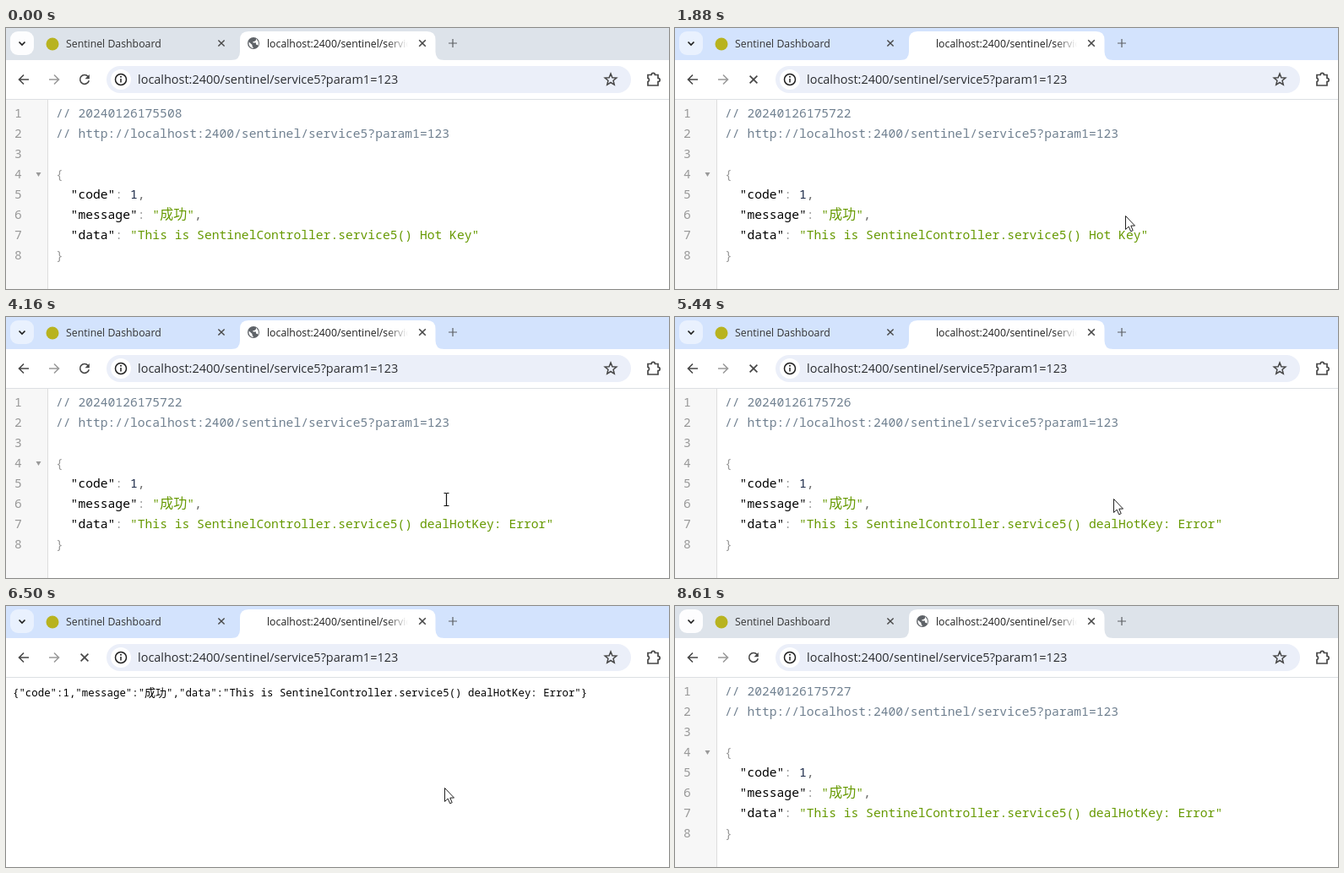
Write an HTML page with a canvas that moves like this. It is 785x309 px and loops after 8680 ms.

```html
<!DOCTYPE html>
<html lang="en">
<head>
<meta charset="utf-8">
<title>Hot key reload</title>
<style>
  html, body { margin: 0; width: 785px; height: 309px; overflow: hidden; background: #fff; }
  canvas { display: block; }
</style>
</head>
<body>
<canvas id="stage" width="785" height="309"></canvas>
<script>
const ctx = document.getElementById('stage').getContext('2d');
const LOOP = 8680, STEP = 70, CHAR = 8.8;
const mono = size => `${size}px "Noto Sans Mono", "DejaVu Sans Mono", monospace`;
const cjk = size => `${size}px "Noto Sans CJK SC", "Noto Sans CJK", sans-serif`;
const ui = size => `${size}px "Open Sans", "Noto Sans", sans-serif`;
const MONO = mono(14.67);
const INK = '#1f1f1f', ICON = '#474747', GREY = '#999', GREEN = '#669900', SLATE = '#708090';
const COMMA = '#666';
const URL_TEXT = 'localhost:2400/sentinel/service5?param1=123';

// Each reload: start, optional unformatted page, new content, end of loading, fold arrow shown
const loads = [
  { start: -999, show: -999, done: -999, fold: -999, stamp: '5508', error: false },
  { start: 880, blank: 1020, show: 1090, done: 1230, fold: 1610, stamp: '5722', error: false },
  { start: 1880, show: 1960, done: 2070, fold: 2330, stamp: '5722', error: true },
  { start: 4640, show: 4710, done: 4760, fold: 5110, stamp: '5725', error: false },
  { start: 5370, show: 5440, done: 5510, fold: 5650, stamp: '5726', error: true },
  { start: 5720, blank: 5790, raw: true, show: 5860, done: 5900, fold: 6170, stamp: '5726', error: false },
  { start: 6300, blank: 6440, raw: true, show: 6510, done: 6700, fold: 7100, stamp: '5727', error: true }
];

// Pointer path: time, x, y
const path = [
  [70, 712, 298], [220, 519, 214], [910, 519, 214], [1190, 533, 222], [2330, 533, 222],
  [2660, 510, 258], [2870, 489, 250], [2940, 490, 249], [3010, 508, 249], [3080, 527, 249],
  [3150, 584, 249], [3290, 635, 248], [3500, 635, 248], [3780, 519, 215], [6960, 519, 215],
  [7000, 520, 216], [7140, 520, 216], [7800, 746, 302]
];

function pointer(time) {
  const t = Math.floor(time / STEP) * STEP;
  let i = 1;
  while (i < path.length - 1 && path[i][0] < t) i++;
  const [t0, x0, y0] = path[i - 1], [t1, x1, y1] = path[i];
  const k = Math.min(1, Math.max(0, (t - t0) / (t1 - t0)));
  return { x: Math.round(x0 + (x1 - x0) * k), y: Math.round(y0 + (y1 - y0) * k) };
}

function text(str, x, y, color, font = MONO) {
  ctx.font = font;
  ctx.fillStyle = color;
  ctx.fillText(str, x, y);
}

function disc(x, y, r, color) {
  ctx.fillStyle = color;
  ctx.beginPath();
  ctx.arc(x, y, r, 0, 7);
  ctx.fill();
}

function box(x, y, w, h, r, color) {
  ctx.fillStyle = color;
  ctx.beginPath();
  ctx.roundRect(x, y, w, h, r);
  ctx.fill();
}

function stroke(d, color = ICON, width = 1.6) {
  ctx.strokeStyle = color;
  ctx.lineWidth = width;
  ctx.stroke(new Path2D(d));
}

function fill(d, color) {
  ctx.fillStyle = color;
  ctx.fill(new Path2D(d));
}

const cross = (x, y, r, width) =>
  stroke(`M${x - r} ${y - r}L${x + r} ${y + r}M${x + r} ${y - r}L${x - r} ${y + r}`, ICON, width);

function globe() {
  disc(293, 18, 7, '#5f6368');
  fill('M287.6 16.5L291.5 20v1.5l1.2 1.5v1A6 6 0 0 1 287.6 16.5Z', '#fff');
  fill('M291.5 12.5h4.5v2l-2 1.5h-1.5v1.5h3.5v2.2h1.6l1 1.2A6 6 0 0 0 298.3 15.5L296 12.5Z', '#fff');
}

function star() {
  ctx.beginPath();
  for (let i = 0; i < 10; i++) {
    const a = i * Math.PI / 5 - Math.PI / 2, r = i % 2 ? 3.2 : 7.2;
    ctx.lineTo(716 + r * Math.cos(a), 61.3 + r * Math.sin(a));
  }
  ctx.closePath();
  ctx.strokeStyle = ICON;
  ctx.lineWidth = 1.5;
  ctx.stroke();
}

function tabs(active, loading) {
  ctx.fillStyle = active ? '#d3e3fd' : '#dde3ea';
  ctx.fillRect(0, 0, 785, 38);
  box(5, 4, 28, 28, 9, active ? '#e9f1fe' : '#fdfdfe');
  stroke('M15.5 16.5L19 20L22.5 16.5', INK, 1.7);

  disc(55, 19, 7.5, '#b8b31f');
  text('Sentinel Dashboard', 71, 23, '#333', ui(12.3));
  cross(255, 18, 3.6, 1.4);

  fill('M267 38Q277 38 277 28V14Q277 4 287 4H498.5Q508.5 4 508.5 14V28Q508.5 38 518.5 38Z', '#fff');
  if (!loading) globe();
  const fade = ctx.createLinearGradient(450, 0, 476, 0);
  fade.addColorStop(0, INK);
  fade.addColorStop(1, 'rgba(31,31,31,0)');
  text(URL_TEXT, 309, 23, fade, ui(12.3));
  cross(493, 18, 3.8, 1.6);
  stroke('M524 18H534M529 13V23', '#5c5f63', 1.2);
}

function toolbar(loading) {
  ctx.fillStyle = '#fff';
  ctx.fillRect(0, 38, 785, 46);
  ctx.fillStyle = '#dcdfe3';
  ctx.fillRect(0, 84, 785, 1);

  stroke('M27 61H16M21 55.5L15.5 61L21 66.5');
  stroke('M51 61H62M57 55.5L62.5 61L57 66.5', '#9b9b9b');
  if (loading) {
    cross(93, 61, 4.4, 1.7);
  } else {
    stroke('M97.2 57.4A5.4 5.4 0 1 0 98.3 62.3');
    fill('M98.8 55V60.3H93.5Z', ICON);
  }

  box(119, 45, 621, 32, 16, '#ebeff9');
  disc(136, 61, 12, '#fff');
  stroke('M142.5 61A6.5 6.5 0 1 1 129.5 61A6.5 6.5 0 1 1 142.5 61M136 60V64.6', INK, 1.5);
  disc(136, 57.8, 1, INK);
  text(URL_TEXT, 156, 66, '#2b2d31', ui(14.48));
  star();
  stroke('M760 55.5H764.2A2.1 2.1 0 0 1 768.4 55.5H772V59.3A2.2 2.2 0 0 1 772 63.7V68H760V63.6' +
    'A2.2 2.2 0 0 0 760 59.4Z', ICON, 1.7);
}

// Writes [string, colour] pieces one after another
function line(x, y, parts, latin = MONO, han = cjk(16)) {
  for (const [str, color] of parts) {
    const wide = /[^\x00-\xff]/.test(str);
    text(str, x, y, color, wide ? han : latin);
    x += ctx.measureText(str).width;
  }
}

const row = (n, x, ...parts) => line(x, 82 + n * 24, parts);
const data = load =>
  `"This is SentinelController.service5() ${load.error ? 'dealHotKey: Error' : 'Hot Key'}"`;

function rawPage(load) {
  const parts = ['{"code":1,"message":"', '成功', `","data":${data(load)}}`];
  line(8, 107, parts.map(str => [str, '#000']), mono(12.4), cjk(13));
}

function page(load, folded, selected) {
  ctx.fillStyle = '#f7f7f7';
  ctx.fillRect(0, 85, 49, 224);
  ctx.fillStyle = '#ddd';
  ctx.fillRect(49, 85, 1, 224);
  for (let n = 1; n <= 8; n++) row(n, 10, [String(n), GREY]);
  if (folded) fill('M35.5 171H41.5L38.5 176Z', GREY);

  if (selected) {
    ctx.fillStyle = '#d5d0f0';
    ctx.fillRect(490, 233, selected * CHAR, 24);
  }
  const left = 59, inner = left + 2 * CHAR;
  row(1, left, ['// 2024012617' + load.stamp, SLATE]);
  row(2, left, ['// http://' + URL_TEXT, SLATE]);
  row(4, left, ['{', GREY]);
  row(5, inner, ['"code"', '#000'], [': ', GREY], ['1', '#1c2a48'], [',', COMMA]);
  row(6, inner, ['"message"', '#000'], [': ', GREY], ['"', GREEN], ['成功', GREEN], ['"', GREEN], [',', COMMA]);
  row(7, inner, ['"data"', '#000'], [': ', GREY], [data(load), GREEN]);
  row(8, left, ['}', GREY]);
}

function cursor(t, p) {
  const beam = (t >= 2400 && t < 4640) || (t >= 7030 && p.y < 281);
  ctx.save();
  ctx.translate(p.x + 0.5, p.y + 0.5);
  if (beam) {
    stroke('M-1 -7H1Q2 -7 2 -6Q2 -7 3 -7H5M2 -6V7M-1 8H1Q2 8 2 7Q2 8 3 8H5', '#111', 1.2);
  } else {
    const d = 'M0 0V16L3.7 12.6L6.2 18.3L8.7 17.2L6.3 11.6H11Z';
    fill(d, '#fff');
    stroke(d, '#222', 1);
  }
  ctx.restore();
}

function draw(t) {
  const load = loads.findLast(l => t >= l.start);
  const shown = loads.findLast(l => t >= l.show);
  const loading = t < load.done;
  const blank = t >= load.blank && t < load.show;
  const dragged = t >= 2940 && t < 3850;
  const reach = t < 3500 ? pointer(t - STEP).x : 640;
  const selected = dragged ? Math.max(0, Math.min(17, Math.round((reach - 490) / CHAR))) : 0;

  ctx.fillStyle = '#fff';
  ctx.fillRect(0, 0, 785, 309);
  tabs(t >= 420 && t < 8610, loading);
  toolbar(loading);
  if (!blank) page(shown, t >= shown.fold, selected);
  else if (load.raw) rawPage(load);

  if (t >= 70 && t < 7810) {
    const p = pointer(t);
    const pressed = (t >= 2870 && t < 3500) || (t >= 3850 && t < 4160);
    cursor(t, p);
    if (pressed) disc(p.x, p.y + 0.5, 10, 'rgba(255,240,0,.6)');
  }
}

const begin = performance.now();
function tick() {
  draw((performance.now() - begin) % LOOP);
  requestAnimationFrame(tick);
}
tick();
</script>
</body>
</html>
```
